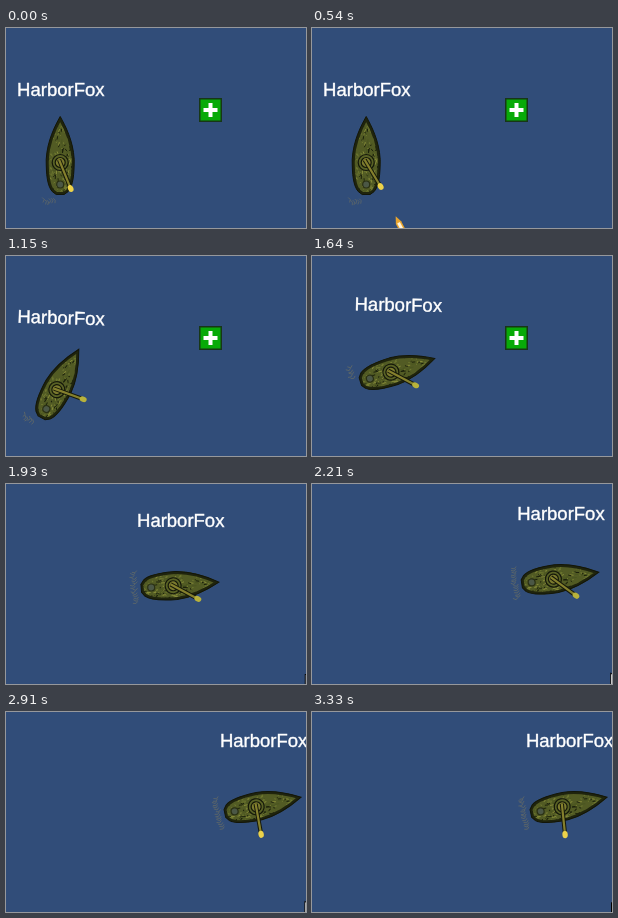
Write an HTML page with a canvas that moves like this. It is 300x200 px and loops after 3410 ms.

```html
<!DOCTYPE html>
<html lang="en">
<head>
<meta charset="utf-8">
<title>Gunboat</title>
<style>
html, body { margin: 0; width: 100%; height: 100%; overflow: hidden; background: #314d79; }
canvas { display: block; width: 300px; height: 200px; }
</style>
</head>
<body>
<canvas id="stage" width="300" height="200"></canvas>
<script>
const ctx = document.getElementById('stage').getContext('2d');
const LOOP = 3410;
const RAD = Math.PI / 180;
const hull = new Path2D('M0-39C5-30 13-15 14 4C14 19 13 30 8 36L4 39H-4L-8 36C-13 30-14 19-14 4C-13-15-5-30 0-39Z');

function randomizer(seed) {
  return () => (seed = seed * 16807 % 2147483647) / 2147483647;
}

function ramp(t, from, to) {
  return Math.min(1, Math.max(0, (t - from) / (to - from)));
}

function smooth(t, from, to) {
  const u = ramp(t, from, to);
  return u * u * (3 - 2 * u);
}

// After an initial hold the picture advances in slowly lengthening ticks.
const tickTime = k => 130 + 67.2 * k + 0.05 * k * k;

function snap(t) {
  if (t < tickTime(0)) return 0;
  let k = 0;
  while (k < 46 && tickTime(k + 1) <= t) k++;
  return tickTime(k);
}

// Turn on the spot, run to the right along a flattening arc, then settle.
function poseAt(t) {
  const run = smooth(t, 1411, 2302);
  const rise = Math.sqrt(run);
  const x = 54.2 + 202.8 * run;
  const y = 127.5 - 34.2 * rise;
  return {
    x, y,
    heading: 86 * smooth(t, 640, 1960) - 8 * ramp(t, 1900, 2400),
    aim: 68 - 48 * smooth(t, 300, 1150) + 8 * smooth(t, 1150, 1640) + 56 * smooth(t, 1900, 3100),
    labelX: x + 0.6,
    labelY: y - 59.5 + 1.5 * rise,
    tilt: 1.8 * Math.sin(Math.PI * ramp(t, 600, 1920))
  };
}

function at(x, y, degrees, draw) {
  ctx.save();
  ctx.translate(x, y);
  ctx.rotate(degrees * RAD);
  draw();
  ctx.restore();
}

function rect(color, x, y, w, h) {
  ctx.fillStyle = color;
  ctx.fillRect(x, y, w, h);
}

function disc(x, y, r, fill, stroke) {
  ctx.beginPath();
  ctx.arc(x, y, r, 0, 7);
  ctx.fillStyle = fill;
  ctx.fill();
  ctx.strokeStyle = stroke;
  ctx.lineWidth = 1.2;
  ctx.stroke();
}

function line(color, width, ...pts) {
  ctx.beginPath();
  for (let i = 0; i < pts.length; i += 2) ctx.lineTo(pts[i], pts[i + 1]);
  ctx.strokeStyle = color;
  ctx.lineWidth = width;
  ctx.stroke();
}

function polygon(fill, ...pts) {
  ctx.beginPath();
  for (let i = 0; i < pts.length; i += 2) ctx.lineTo(pts[i], pts[i + 1]);
  ctx.closePath();
  ctx.fillStyle = fill;
  ctx.fill();
}

// Only the left engine churns while the boat turns on the spot.
function drawWake(t) {
  const rnd = randomizer(71 + Math.floor(t));
  const end = t < 1770 ? -7 : 14;
  for (let x = -18; x < end; x += 2.2) {
    const y = 42 + rnd() * 3;
    line('#5f6868', 0.8, x, y, x + 2, y + 2, x + rnd() * 2, y + 5);
  }
}

function drawHull() {
  ctx.fillStyle = '#525b24';
  ctx.fill(hull);
  ctx.save();
  ctx.clip(hull);
  const rnd = randomizer(23);
  const tones = ['#1b200b', '#858a38', '#49551f', '#6d772f'];
  for (let i = 0; i < 240; i++) {
    const x = rnd() * 28 - 14, y = rnd() * 76 - 38;
    line(tones[i % 4], 1, x, y, x + rnd() * 4 - 2, y + rnd() * 5);
  }
  ctx.strokeStyle = '#1f240d';
  ctx.lineWidth = 5;
  ctx.stroke(hull);
  ctx.restore();
  ctx.strokeStyle = '#12150a';
  ctx.lineWidth = 1;
  ctx.stroke(hull);
  disc(0, 7, 8, '#596225', '#15180a');
  disc(0, 7, 5, '#7b7a2e', '#15180a');
  disc(0, 29, 3.5, '#4b5745', '#2a3014');
}

function drawGun(aim) {
  line('#15180a', 4.2, -3, 0, 26, 0);
  line('#85802d', 2.2, -3, 0, 26, 0);
  ctx.beginPath();
  ctx.ellipse(28, 0, 3.6, 2.7, 0, 0, 7);
  ctx.fillStyle = aim > 54 ? '#ecd24a' : '#b8b23b';
  ctx.fill();
}

function drawShell() {
  polygon('#e9a52f', -7, -0.5, 0, -3, 9, -3, 9, 3, 0, 3);
  rect('#fff4dc', 0, -1.5, 9, 3);
}

function drawPickup() {
  rect('#173717', 193, 70, 23, 24);
  rect('#08aa08', 194.5, 71.5, 20, 21);
  rect('#fff', 197.5, 80, 14, 4);
  rect('#fff', 202.5, 75, 4, 14);
}

function drawPointer(x, y) {
  polygon('#fff', x, y, x, y + 16, x + 11, y + 11);
  ctx.strokeStyle = '#000';
  ctx.lineWidth = 1;
  ctx.stroke();
}

function drawLabel() {
  ctx.font = '18.5px "Liberation Sans", Arial, sans-serif';
  ctx.textAlign = 'center';
  ctx.fillStyle = ctx.strokeStyle = '#fff';
  ctx.lineWidth = 0.4;
  ctx.fillText('HarborFox', 0, 0);
  ctx.strokeText('HarborFox', 0, 0);
}

function render(t) {
  const { x, y, heading, aim, labelX, labelY, tilt } = poseAt(t);
  rect('#314d79', 0, 0, 300, 200);
  if (t < 1845) drawPickup();

  at(x, y, heading, () => {
    drawWake(t);
    drawHull();
  });
  const gunX = x - 7 * Math.sin(heading * RAD);
  const gunY = y + 7 * Math.cos(heading * RAD);
  at(gunX, gunY, aim, () => drawGun(aim));

  if (t > 460 && t < 670) {
    const reach = 30 + (t - 468) * 0.57;
    at(54.5 + reach * Math.cos(62 * RAD), 134.5 + reach * Math.sin(62 * RAD), 62, drawShell);
  }

  at(labelX, labelY, tilt, drawLabel);

  if (t > 1765) {
    const nudge = Math.sin(Math.PI * ramp(t, 1800, 3200));
    drawPointer(299.5 - nudge, 190.5 - 2 * nudge);
  }
}

const start = performance.now();
function tick() {
  render(snap((performance.now() - start) % LOOP));
  requestAnimationFrame(tick);
}
tick();
</script>
</body>
</html>
```
